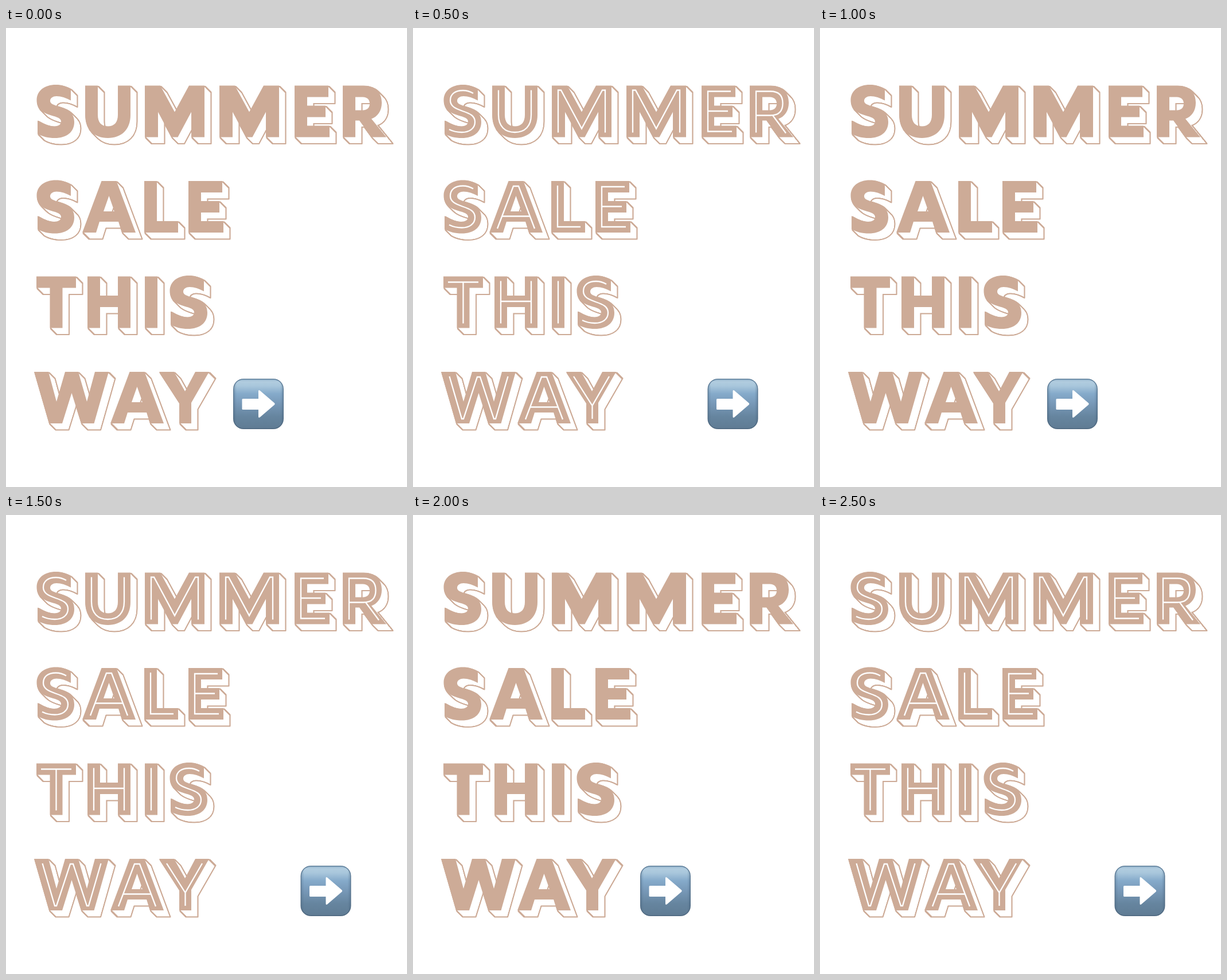
An HTML page with a canvas for the animation above (3000 ms loop, 699 px wide and 801 px high).

```html
<!DOCTYPE html>
<html lang="en">
<head>
<meta charset="utf-8">
<title>Summer sale this way</title>
<style>
  html, body { margin: 0; width: 100%; height: 100%; overflow: hidden; background: #fff; }
  canvas { display: block; }
</style>
</head>
<body>
<canvas id="stage" width="699" height="801" role="img" aria-label="Summer sale this way"></canvas>
<script>
const ctx = document.getElementById('stage').getContext('2d');
const TAN = '#cdab97';
const BEAT = 500;
const LINE = 2.1;
const DEPTH = 11.5;

// Each letter: outline and centre line, cap height 90
const shapes = {
  S: ['M60 6C52 1 44-1.5 34-1.5C14-1.5.5 9 .5 25.5C.5 42 12 48 29 53C40 56 43 58.5 43 63C43 68 38 71 31 71C22 71 12 67 2 61V84C10 89 21 91.5 32 91.5C53 91.5 66 81 66 63.5C66 47 55 41 38 36C27 33 24 30.5 24 26.5C24 21.5 29 18.5 35 18.5C43 18.5 52 21.5 60 26Z',
      'M52 13.5C47 10.5 41 8.5 34 8.5C20 8.5 12 15 12 26C12 36 21 40 33.5 44.5C47 49 55 53 55 63.5C55 75 45 81.5 32 81.5C24 81.5 17 80 10 76.5'],
  U: ['M0 0H22V51C22 64 28 71 39.5 71S57 64 57 51V0H79V51C79 77 63 91.5 39.5 91.5S0 77 0 51Z',
      'M11 8V51C11 71 22 81.5 39.5 81.5S68 71 68 51V8'],
  M: ['M0 0H27L52 46L77 0H104V90H81V46L57.5 90H46.5L23 46V90H0Z',
      'M11 82V8H16L52 75L88 8H93V82'],
  E: ['M0 0H59V20H22V35H54V55H22V70H61V90H0Z',
      'M51 10H11V80H53M11 44.5H46'],
  R: ['M0 0H36C57 0 68 12 68 30C68 44 61 54 50 58L76 90H50L29 61H22V90H0ZM22 20V43H35C43 43 47 38 47 31.5S43 20 35 20Z',
      'M11 82V10H36C51 10 57.5 18 57.5 31C57.5 45 50 52 36 52H11M40 52L63 83'],
  A: ['M33.5 0H59.5L93 90H69L63 71H30L24 90H0ZM46.5 26L37 53H56Z',
      'M14 83L42 9H51L79 83M22 61.5H71'],
  L: ['M0 0H22V70H59V90H0Z', 'M11 8V80H51'],
  T: ['M0 0H69V20H45.5V90H23.5V20H0Z', 'M8 10H61M34.5 10V82'],
  H: ['M0 0H22V33.5H53V0H75V90H53V53.5H22V90H0Z', 'M11 8V82M64 8V82M11 43.5H64'],
  I: ['M0 0H22V90H0Z', 'M11 8V82'],
  W: ['M0 0H25L39 52L54 0H77L92 52L106 0H130L104.5 90H82L65.5 37L49 90H26Z',
      'M14.5 8L36 82H39L63 9H68L92 82H95L116.5 8'],
  Y: ['M0 0H26L45 34L63 0H87L56 54V90H35V54Z',
      'M13 8L45.5 59L75 8M45.5 59V82']
};

const rows = [
  ['SUMMER', [53, 138, 242, 372, 503, 587]],
  ['SALE', [53, 133, 241, 318]],
  ['THIS', [53, 142, 242, 285]],
  ['WAY', [49, 182, 267]]
];

// White letter body, thinned by half a line all round and kept at high resolution
function makeCore(outline) {
  const core = document.createElement('canvas');
  core.width = 560;
  core.height = 400;
  const c = core.getContext('2d');
  c.scale(4, 4);
  c.translate(4, 4);
  c.fillStyle = '#fff';
  c.fill(outline);
  c.globalCompositeOperation = 'destination-out';
  c.lineWidth = LINE;
  c.stroke(outline);
  return core;
}

const glyphs = {};
for (const [letter, [edge, centre]] of Object.entries(shapes)) {
  const outline = new Path2D(edge);
  glyphs[letter] = { outline, inline: new Path2D(centre), core: makeCore(outline) };
}

function at(x, y, draw) {
  ctx.save();
  ctx.translate(x, y);
  draw();
  ctx.restore();
}

function sweep(draw) {
  for (let d = 1.5; d <= DEPTH; d += 0.5) at(d, d, draw);
}

function drawLetter({ outline, inline, core }, inlined) {
  ctx.lineJoin = 'round';
  ctx.lineWidth = LINE;
  ctx.strokeStyle = TAN;
  sweep(() => ctx.stroke(outline));
  sweep(() => ctx.drawImage(core, -4, -4, 140, 100));
  ctx.fillStyle = TAN;
  ctx.fill(outline);
  if (inlined) {
    ctx.lineJoin = 'miter';
    ctx.lineWidth = 2.3;
    ctx.strokeStyle = '#fff';
    ctx.stroke(inline);
  }
}

function gradient(x, y, stops) {
  const g = ctx.createLinearGradient(0, 0, x, y);
  stops.forEach(([offset, color]) => g.addColorStop(offset, color));
  return g;
}

function tile(inset, fill) {
  ctx.beginPath();
  ctx.roundRect(inset, inset, 88 - 2 * inset, 88 - 2 * inset, 18 - inset);
  ctx.fillStyle = fill;
  ctx.fill();
}

function drawArrow() {
  tile(0, gradient(0, 88, [[0, '#5f7f9b'], [1, '#4d677f']]));
  tile(1.5, gradient(0, 88, [[0, '#8fb0c9'], [0.06, '#b1ccdf'], [0.14, '#a9c7dc'], [0.3, '#85aaca'],
    [0.5, '#7798b7'], [0.75, '#66859f'], [1, '#5f7b93']]));
  const edge = 'rgba(65,92,118,.35)', clear = 'rgba(65,92,118,0)';
  tile(1.5, gradient(88, 0, [[0, edge], [0.07, clear], [0.93, clear], [1, edge]]));
  ctx.fillStyle = '#fff';
  ctx.fill(new Path2D('M17 35H44V22Q44 18.5 47 21L72 42.5Q73.5 44 72 45.5L47 67Q44 69.5 44 66V54H17Q15.5 54 15.5 52.5V36.5Q15.5 35 17 35Z'));
}

function draw(second) {
  ctx.fillStyle = '#fff';
  ctx.fillRect(0, 0, 699, 801);
  rows.forEach(([word, xs], row) => {
    [...word].forEach((letter, i) =>
      at(xs[i], 100.5 + 166.5 * row, () => drawLetter(glyphs[letter], second)));
  });
  at(second ? 513.5 : 396, 612, drawArrow);
}

let shown = null;
const start = performance.now();
function tick() {
  const second = Math.floor((performance.now() - start) / BEAT) % 2 === 1;
  if (second !== shown) draw(shown = second);
  requestAnimationFrame(tick);
}
tick();
</script>
</body>
</html>
```
